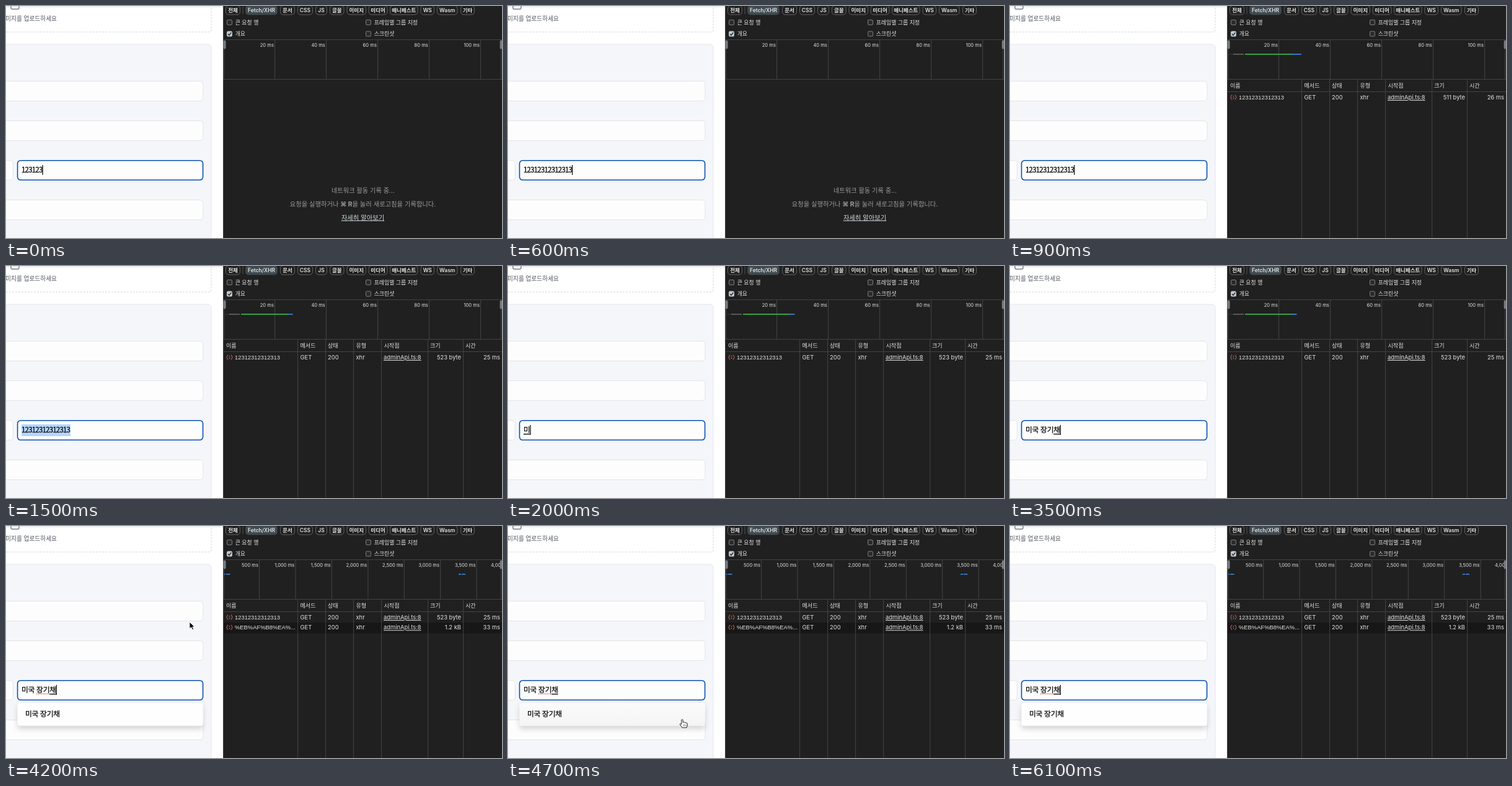
These frames come from a looping animation (800 px wide and 375 px high, 6.2 s). An HTML page:

```html
<!DOCTYPE html>
<html lang="ko">
<head>
<meta charset="utf-8">
<title>Search field and network log</title>
<style>
  html, body { margin: 0; width: 100%; height: 100%; overflow: hidden; background: #fff; }
  svg { display: block; width: 800px; height: 375px; }
  text { white-space: pre; font-family: Inter, "Noto Sans CJK KR", "Noto Sans CJK", sans-serif; }
  .form { font-family: "Noto Sans CJK KR", "Noto Sans CJK", sans-serif; }
  .file { font-family: "Liberation Sans", sans-serif; }
  .hangul, .digits { fill: #111; stroke: #111; stroke-width: .3px; }
  .hangul { font-size: 11.8px; letter-spacing: -.3px; }
  .digits { font-size: 11.5px; letter-spacing: -.8px; }
</style>
</head>
<body>
<svg id="stage" viewBox="0 0 800 375">
  <defs>
    <linearGradient id="hover" x2="0" y2="1">
      <stop offset="0" stop-color="#fbfbfb"/><stop offset="1" stop-color="#f4f4f5"/>
    </linearGradient>
    <linearGradient id="topShade" x2="0" y2="1">
      <stop offset="0" stop-color="#e9eaec"/><stop offset="1" stop-color="#fff"/>
    </linearGradient>
    <filter id="shadow" x="-10%" y="-40%" width="120%" height="200%">
      <feDropShadow dx="0" dy="5" stdDeviation="4" flood-opacity=".16"/>
    </filter>
    <clipPath id="page"><rect width="350" height="375"/></clipPath>
  </defs>
</svg>
<script>
const LOOP = 6200, STEP = 100;
const LINE = '#444', BLUE = '#3f7fd0', GREEN = '#3bb54a';
const stage = document.getElementById('stage');

function add(parent, tag, attrs = {}, content) {
  const node = document.createElementNS('http://www.w3.org/2000/svg', tag);
  for (const key in attrs) node.setAttribute(key, attrs[key]);
  if (content !== undefined) node.textContent = content;
  parent.appendChild(node);
  return node;
}
const group = (parent, attrs) => add(parent, 'g', attrs);
const rect = (parent, x, y, width, height, fill, more) =>
  add(parent, 'rect', { x, y, width, height, fill, ...more });
const path = (parent, d, stroke, more) =>
  add(parent, 'path', { d, stroke, fill: 'none', ...more });
const label = (parent, x, y, size, content, more) =>
  add(parent, 'text', { x, y, 'font-size': size, fill: '#e3e3e3', ...more }, content);
const show = (node, on) => node.setAttribute('display', on ? 'inline' : 'none');
const END = { 'text-anchor': 'end' }, MIDDLE = { 'text-anchor': 'middle' };

// Form page
const page = group(stage, { 'clip-path': 'url(#page)' });
rect(page, 0, 0, 350, 375, '#fff');
rect(page, 0, 0, 350, 4, 'url(#topShade)');
path(page, 'M-5 42H327Q331 42 331 38V-5', '#d3d6db', { 'stroke-dasharray': '3 2' });
rect(page, 8, -9, 13, 14, 'none', { rx: 2, stroke: '#777d86', 'stroke-width': 1.4 });
label(page, 82, 24, 9.7, '이미지를 업로드하세요', { ...END, class: 'form', fill: '#4d535e' });
rect(page, -10, 62, 341, 330, '#f5f6fa', { rx: 5, stroke: '#e3e6ec' });
function field(x, y, right) {
  rect(page, x, y, right - x, 32, '#fdfdfd', { rx: 5, stroke: '#e2e4e8' });
}
field(-10, 121.5, 318);
field(-10, 185.5, 318);
field(-10, 249.5, 11.5);
field(-10, 313.5, 318);
rect(page, 18.6, 249.7, 299, 31.6, '#fdfdfd', { rx: 5, stroke: '#0b50ad', 'stroke-width': 1.6 });

const selection = rect(page, 25, 256, 79, 19, '#b4d5fe');
const typed = add(page, 'text', { x: 25, y: 269 });
const underline = rect(page, 25, 271, 10, 1.4, '#111');
const squiggle = path(page, 'M49 271.3H70', '#d8483e', { 'stroke-width': 1.3, 'stroke-dasharray': '1.5 1.2' });
const caret = rect(page, 58, 257, 1.2, 16, '#000');

const dropdown = group(page);
rect(dropdown, 18.5, 285.5, 299.5, 37.5, '#fff', { rx: 4, filter: 'url(#shadow)' });
const option = rect(dropdown, 18.5, 285.5, 299.5, 37.5, '#fefefe', { rx: 4, stroke: '#ececee', 'stroke-width': .6 });
add(dropdown, 'text', { x: 31, y: 307.5, class: 'form hangul' }, '미국 장기채');

// Network panel
const panel = group(stage);
rect(panel, 350, 0, 450, 375, '#202020');
path(panel, 'M350.5 0V375', LINE);

const chips = [
  ['전체', 354, 378], ['Fetch/XHR', 386, 438], ['문서', 442, 466], ['CSS', 470, 495],
  ['JS', 499, 518], ['글꼴', 522, 545.5], ['이미지', 549.5, 581], ['미디어', 584.5, 615.5],
  ['매니페스트', 619, 664.5], ['WS', 668.5, 691], ['Wasm', 695, 728.5], ['기타', 733, 756]
];
chips.forEach(([name, left, right], i) => {
  const chosen = i === 1;
  rect(panel, left + .5, -.5, right - left - 1, 14.5, chosen ? '#3f4a50' : 'none',
    { rx: 4.5, stroke: chosen ? '#3f4a50' : '#757575', 'stroke-width': .8 });
  label(panel, (left + right) / 2, 10, 8.5, name, { ...MIDDLE, 'font-weight': 600 });
});
path(panel, 'M382 1V13', '#5e5e5e', { 'stroke-width': .8 });

function checkbox(x, y, name, checked) {
  rect(panel, x + .5, y + .5, 8, 8, checked ? '#bfcbd2' : '#2c2c2c',
    { rx: 1.5, stroke: checked ? '#bfcbd2' : '#858585', 'stroke-width': .9 });
  if (checked) path(panel, `M${x + 2} ${y + 4.7}l2 2 3.4-4.4`, '#202020', { 'stroke-width': 1.3 });
  label(panel, x + 13.7, y + 7.7, 8.9, name);
}
checkbox(356, 22, '큰 요청 행');
checkbox(580, 22, '프레임별 그룹 지정');
checkbox(356, 40.5, '개요', true);
checkbox(580, 40.5, '스크린샷');

path(panel, 'M351 54.5H800M351 118.5H800', LINE);

function ruler(first, gap, names) {
  const g = group(panel);
  names.forEach((name, i) => {
    const x = first + gap * i;
    path(g, `M${x} 55V118`, LINE);
    label(g, x - 1.7, 66, 7.6, name, END);
  });
  return g;
}
function bars(parent, list) {
  list.forEach(([from, to, color, height = 1.7]) => rect(parent, from, 78 - height / 2, to - from, height, color));
}
const shortRuler = ruler(433.6, 83, [20, 40, 60, 80, 100].map(n => n + ' ms'));
const longRuler = ruler(408.7, 58.4, [1, 2, 3, 4, 5, 6, 7, 8].map(n => (n * 500).toLocaleString('en-US') + ' ms'));
const shortBars = group(panel);
bars(shortBars, [[353, 360, '#3c3c3c', 1], [360, 377, '#777', 1.3], [379, 455, GREEN]]);
const download = rect(shortBars, 455, 77.1, 15, 1.8, BLUE);
bars(longRuler, [[352, 354, '#3a6f9c'], [355, 361.5, BLUE], [730, 734, BLUE], [735, 741, BLUE]]);

path(panel, 'M351.5 55V118M798.7 55V118', LINE);
[351, 797].forEach(x => rect(panel, x, 56, 3.2, 13, '#70777d', { rx: 1.4, stroke: '#a4a9ad', 'stroke-width': .5 }));

const emptyNote = group(panel);
const noteStyle = { ...MIDDLE, fill: '#9c9c9c' };
label(emptyNote, 576, 302, 10.2, '네트워크 활동 기록 중...', noteStyle);
const hint = label(emptyNote, 575.5, 324, 10.3, '요청을 실행하거나 ', noteStyle);
add(hint, 'tspan', { 'font-weight': 700 }, '⌘ R');
add(hint, 'tspan', {}, '을 눌러 새로고침을 기록합니다.');
label(emptyNote, 575.5, 345.5, 10.3, '자세히 알아보기', { ...MIDDLE, fill: '#d2dce0', 'text-decoration': 'underline' });

const table = group(panel);
const secondRow = group(table);
rect(secondRow, 351, 156, 449, 17.5, '#171717');
path(table, 'M351 138.5H800', LINE);
[470, 515, 560, 605, 680, 737].forEach(x => path(table, `M${x + .6} 119V375`, LINE));
[['이름', 355], ['메서드', 474.5], ['상태', 519], ['유형', 564.5], ['시작점', 609.5], ['크기', 684], ['시간', 741]]
  .forEach(([name, x]) => label(table, x, 131.7, 9.1, name));

function jsonIcon(parent, x, y) {
  const g = group(parent, { transform: `translate(${x} ${y})` });
  const brace = 'M-2.2-3.6Q-3.8-3.8-3.6-2Q-3.6-.4-5 0Q-3.6.4-3.6 2Q-3.8 3.8-2.2 3.6';
  path(g, brace, '#e2694c');
  path(g, brace, '#e2694c', { transform: 'scale(-1 1)' });
  path(g, 'M0-2.2V-.8M0 .8V2.4', '#e2694c', { 'stroke-width': 1.4 });
}
function row(parent, y, name) {
  jsonIcon(parent, 360.5, y - 3.5);
  label(parent, 369, y, 9.4, name, { class: 'file' });
  [['GET', 474.5], ['200', 519], ['xhr', 564.5]].forEach(([s, x]) => label(parent, x, y, 9.4, s));
  label(parent, 609, y, 9.4, 'adminApi.ts:8', { 'text-decoration': 'underline' });
  return [734, 797].map(x => label(parent, x, y, 9.4, '', END));
}
const [firstSize, firstTime] = row(table, 151, '12312312312313');
const [nextSize, nextTime] = row(secondRow, 167.3, '%EB%AF%B8%EA%...');
nextSize.textContent = '1.2 kB';
nextTime.textContent = '33 ms';

// Pointers, with the hot spot at 0,0
const arrow = group(stage);
path(arrow, 'M0 0V11.2L2.7 8.8L4.6 13L6.6 12.1L4.8 8.1H8.3Z', '#fff', { fill: '#000', 'stroke-width': 1 });
const hand = group(stage);
path(hand, 'M-1.2 1Q0-.8 1.2 1V5Q2.5 3.8 3.6 5.2Q5 4.3 6 5.8Q7.9 5 8.3 7.2V9.5Q8.2 11.3 7 13.4H.2L-3.6 8.6Q-4.2 5.8-1.2 8Z',
  '#222', { fill: '#fff', 'stroke-linejoin': 'round' });
path(hand, 'M2 8.2V11M4 8.2V11M6 8.2V11', '#444', { 'stroke-width': .7 });

// Timeline
const DIGITS = '12312312312313';
const SYLLABLES = [
  [1800, 'ㅁ'], [1900, '미'], [2100, '믹'], [2200, '미구'], [2300, '미국'], [2400, '미국 '],
  [2500, '미국 ㅈ'], [2600, '미국 자'], [2800, '미국 장'], [2900, '미국 장ㄱ'], [3000, '미국 장기'],
  [3200, '미국 장깇'], [3400, '미국 장기채']
];
const TRACK = [
  [4200, 296, 155], [4400, 290, 230], [4600, 281, 310], [4800, 281, 315],
  [4900, 290, 285], [5000, 325, 190], [5100, 376, 60], [5200, 380, 40]
];
const CARET_OFF = [[1100, 1800], [4500, 4900], [5400, 5800]];

function pointerAt(t) {
  const i = TRACK.findIndex(([time]) => time > t);
  if (i < 1) return null;
  const [t0, x0, y0] = TRACK[i - 1], [t1, x1, y1] = TRACK[i];
  const k = (t - t0) / (t1 - t0);
  return [x0 + (x1 - x0) * k, y0 + (y1 - y0) * k];
}

function drawInput(t) {
  const korean = t >= 1800;
  const content = korean
    ? SYLLABLES.filter(([time]) => time <= t).pop()[1]
    : DIGITS.slice(0, Math.round(6 + 8 * Math.min(t / 600, 1)));
  typed.setAttribute('class', korean ? 'form hangul' : 'form digits');
  if (typed.textContent !== content) typed.textContent = content;

  const width = typed.getComputedTextLength();
  const composing = korean && !content.endsWith(' ');
  show(underline, composing);
  if (composing) {
    const start = content.length > 1 ? typed.getSubStringLength(0, content.length - 1) : 0;
    underline.setAttribute('x', 25 + start);
    underline.setAttribute('width', width - start);
  }
  caret.setAttribute('x', 25 + width);
  show(caret, !CARET_OFF.some(([from, to]) => t >= from && t < to));
  show(selection, t >= 1500 && t < 1800);
  show(squiggle, t >= 3800);
}

function drawNetwork(t) {
  const logged = t >= 800, settled = t >= 1000, second = t >= 3700;
  show(emptyNote, !logged);
  show(table, logged);
  show(secondRow, second);
  show(shortRuler, !second);
  show(longRuler, second);
  show(shortBars, logged && !second);
  download.setAttribute('width', settled ? 7.5 : 15);
  firstSize.textContent = settled ? '523 byte' : '511 byte';
  firstTime.textContent = settled ? '25 ms' : '26 ms';
}

function drawPointer(t) {
  const at = pointerAt(t);
  const over = !!at && at[0] > 18 && at[0] < 318 && at[1] > 285 && at[1] < 323;
  show(arrow, at && !over);
  show(hand, over);
  if (at) (over ? hand : arrow).setAttribute('transform', `translate(${at})`);
  show(dropdown, t >= 3700);
  option.setAttribute('fill', over ? 'url(#hover)' : '#fefefe');
}

function render(time) {
  const t = Math.floor(time % LOOP / STEP) * STEP;
  drawInput(t);
  drawNetwork(t);
  drawPointer(t);
}

const began = performance.now();
function tick() {
  render(performance.now() - began);
  requestAnimationFrame(tick);
}
tick();
</script>
</body>
</html>
```
